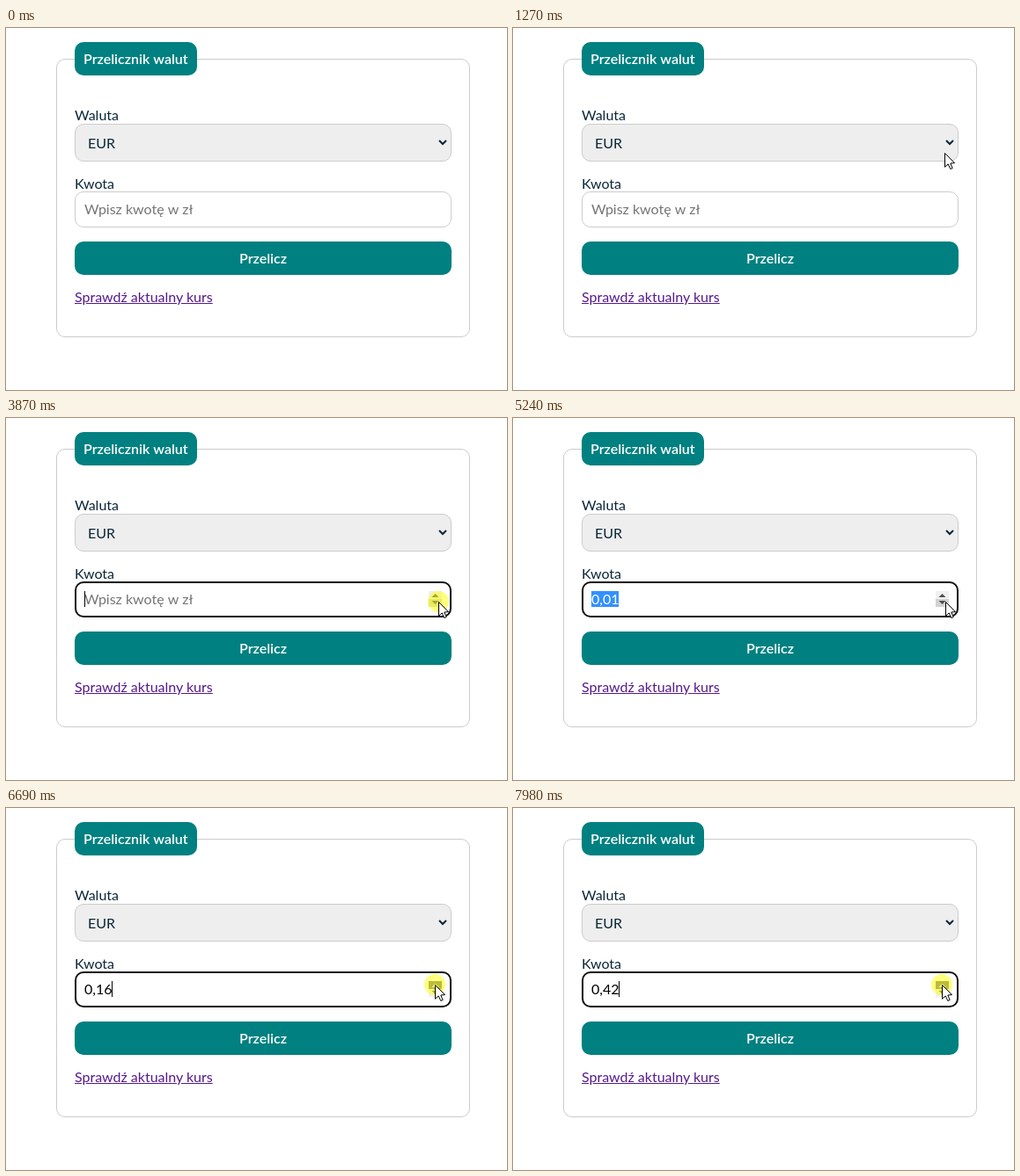
Write an HTML page with a canvas that moves like this. It is 569 by 412 pixels and loops after 8 s.

```html
<!DOCTYPE html>
<html lang="pl">
<head>
<meta charset="utf-8">
<title>Przelicznik walut</title>
<style>
  html, body { margin: 0; width: 100%; height: 100%; overflow: hidden; background: #fff; }
  canvas { position: absolute; left: 0; top: 0; }
  #link {
    position: absolute; left: 78px; top: 296px;
    font: 16px/19px Lato, sans-serif; white-space: nowrap;
    color: #551a8b; text-decoration: underline;
  }
</style>
</head>
<body>
<canvas id="stage" width="569" height="412"></canvas>
<span id="link">Sprawdź aktualny kurs</span>
<script>
const LOOP = 8000;
const ENTER = 670, FOCUS = 3870, SELECT = 4570, HOLD = 5830, REPEAT = 6060;
const TEAL = '#008080', INK = '#0a2738', BORDER = '#ccc';
const ctx = document.getElementById('stage').getContext('2d');

const within = (t, from, to) => t >= from && t < to;

// Ease-out from 0 to 1; the pointer is refreshed every 30 ms while it travels.
function ease(t, start, duration, power) {
  if (t <= start) return 0;
  if (t >= start + duration) return 1;
  const u = Math.floor((t - start) / 30) * 30 / duration;
  return 1 - Math.pow(1 - u, power);
}

function pointer(t) {
  const nudge = ease(t, 2820, 60, 1.4);
  const lift = ease(t, 5340, 310, 1.5);
  const x = 511 - 21 * ease(t, ENTER, 600, 14) + nudge - 4 * lift;
  const y = 398 - 256 * ease(t, ENTER, 600, 3.7) + 13 * nudge
    + 54 * ease(t, 3080, 290, 1.5) - 8 * lift;
  return { x: Math.round(x), y: Math.round(y) };
}

function amount(t) {
  if (t < FOCUS + 40) return '';
  let n = 1;
  if (t >= HOLD) n = 2;
  if (t >= REPEAT) n = 3 + Math.round((t - REPEAT) / 49.6);
  return '0,' + String(n).padStart(2, '0');
}

function box(x, y, w, h, fill, stroke, width = 1) {
  const d = stroke ? width / 2 : 0;
  ctx.beginPath();
  ctx.roundRect(x + d, y + d, w - 2 * d, h - 2 * d, 10 - d);
  if (fill) { ctx.fillStyle = fill; ctx.fill(); }
  if (stroke) { ctx.strokeStyle = stroke; ctx.lineWidth = width; ctx.stroke(); }
}

function text(str, x, y, color, weight = 400, align = 'left') {
  ctx.font = weight + ' 16px Lato, sans-serif';
  ctx.textAlign = align;
  ctx.fillStyle = color;
  ctx.fillText(str, x, y);
}

function polygon(points, fill) {
  ctx.beginPath();
  points.forEach(([x, y]) => ctx.lineTo(x, y));
  ctx.closePath();
  ctx.fillStyle = fill;
  ctx.fill();
}

function chevron(x, y) {
  ctx.beginPath();
  ctx.moveTo(x - 4, y - 4);
  ctx.lineTo(x, y);
  ctx.lineTo(x + 4, y - 4);
  ctx.strokeStyle = INK;
  ctx.lineWidth = 2;
  ctx.stroke();
}

function spinner(p, pressed) {
  const half = (y, dir) => {
    const hot = within(p.y, y, y + 9);
    const down = hot && pressed;
    const mid = 206 + dir * 4;
    ctx.fillStyle = down ? '#787878' : hot ? '#d2d2d2' : '#f0f0f0';
    ctx.fillRect(480, y, 15, 9);
    polygon(
      [[483.5, mid - dir * 2], [487.5, mid + dir * 2], [491.5, mid - dir * 2]],
      down ? '#fff' : '#505050'
    );
  };
  half(197, -1);
  half(206, 1);
}

function arrow({ x, y }) {
  ctx.save();
  ctx.translate(x, y);
  polygon([
    [0.5, 0.5], [0.5, 16.3], [4.2, 12.9], [6.8, 18.5],
    [9.2, 17.5], [6.8, 12], [11.5, 11.6]
  ], '#fff');
  ctx.strokeStyle = '#000';
  ctx.lineWidth = 1;
  ctx.stroke();
  ctx.restore();
}

function form() {
  box(57, 35, 470, 317, null, BORDER);
  box(78, 16, 139, 38, TEAL);
  text('Przelicznik walut', 88, 41, '#fff', 600);

  text('Waluta', 78, 105, INK);
  box(78, 109, 428, 43, '#eee', BORDER);
  text('EUR', 93, 137, INK);
  chevron(496, 132);

  text('Kwota', 78, 183, INK);
  box(78, 243, 428, 38, TEAL);
  text('Przelicz', 292, 268, '#fff', 600, 'center');
}

function field(t, p, pressed) {
  const focused = t >= FOCUS;
  const selected = within(t, SELECT, HOLD);
  const value = amount(t);

  if (focused) box(78, 186, 428, 41, '#fff', '#101010', 2);
  else box(78, 186, 428, 41, '#fff', BORDER);

  ctx.font = '400 16px Lato, sans-serif';
  const end = 89 + Math.floor(ctx.measureText(value).width);
  if (selected) {
    ctx.fillStyle = '#3390ff';
    ctx.fillRect(89, 197, end - 89, 18);
  }
  if (value) text(value, 89, 212, selected ? '#fff' : '#000');
  else text('Wpisz kwotę w zł', 89, 212, '#757575');

  const caretOn = !within(t, FOCUS + 540, SELECT);
  if (focused && !selected && caretOn) {
    ctx.fillStyle = '#000';
    ctx.fillRect(end, 197, 1, 18);
  }
  if (focused || within(p.y, 186, 227)) spinner(p, pressed && value);
}

function draw(t) {
  const p = pointer(t);
  const pressed = within(t, FOCUS, FOCUS + 200) || within(t, SELECT, SELECT + 280) || t >= HOLD;

  ctx.fillStyle = '#fff';
  ctx.fillRect(0, 0, 569, 412);
  form();
  field(t, p, pressed);

  if (pressed) {
    ctx.beginPath();
    ctx.arc(p.x, p.y, 12, 0, Math.PI * 2);
    ctx.fillStyle = 'rgba(255, 255, 0, 0.5)';
    ctx.fill();
  }
  if (t >= ENTER) arrow(p);
}

const start = performance.now();
function frame() {
  draw((performance.now() - start) % LOOP);
  requestAnimationFrame(frame);
}
frame();
</script>
</body>
</html>
```
